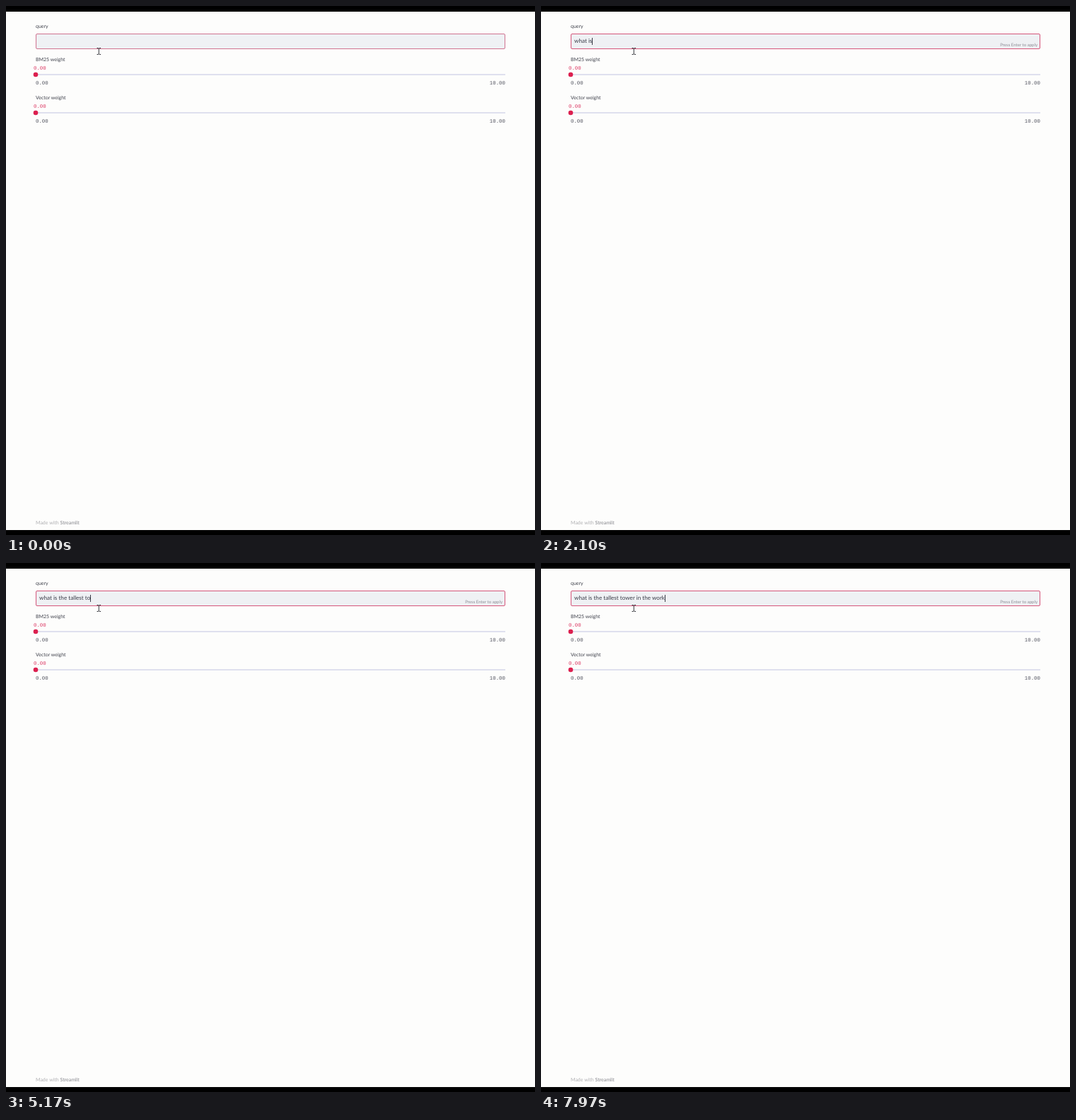
Animation, 748 px wide and 748 px high, one loop 8 s. Source, as an HTML page:

```html
<!DOCTYPE html>
<html lang="en">
<head>
<meta charset="utf-8">
<title>Search weights</title>
<style>
  html, body { margin: 0; width: 100%; height: 100%; overflow: hidden; background: #fdfdfc; }
  svg { display: block; width: 100vw; height: 100vh; }
  text { font: 7px Lato, "Open Sans", sans-serif; fill: #41434d; white-space: pre; text-rendering: geometricPrecision; }
  .num { font: 7.4px "Liberation Mono", "DejaVu Sans Mono", monospace; fill: #555762; }
  .value { fill: #dc3c66; }
  .end { text-anchor: end; }
  #typed { font-size: 8.15px; fill: #3a3c48; }
  #hint { font-size: 6.05px; fill: #8d8e96; }
  .footer { fill: #b0b0b3; }
  .footer tspan { fill: #84858b; }
  #field { fill: #eff1f4; stroke: #d5567a; animation: focus 8s linear infinite; }
  @keyframes focus {
    0% { stroke: #d07390; }
    2.9%, 100% { stroke: #d5567a; }
  }
</style>
</head>
<body>
<svg viewBox="0 0 748 748">
  <rect width="748" height="748" fill="#fdfdfc"/>
  <path d="M0 0H748V8H0zM0 741H748V748H0z"/>

  <text x="42" y="31">query</text>
  <rect id="field" x="42.5" y="39.5" width="663" height="21" rx="1.5"/>
  <text id="typed" x="47" y="52.3"></text>
  <rect id="caret" y="45" width="1" height="10" fill="#3a3c48"/>
  <text id="hint" class="end" x="702" y="57.3">Press Enter to apply</text>

  <g id="sliders"></g>

  <path d="M128.6 59.5H130.4L131.3 60.3L132.2 59.5H134M131.3 60V68M128.6 68.5H130.4L131.3 67.7L132.2 68.5H134"
        fill="none" stroke="#33343a" stroke-width="1"/>
  <text class="footer" x="42" y="732.6">Made with <tspan>Streamlit</tspan></text>
</svg>
<script>
  const LOOP = 8000, CARET_ON = 400, TEXT_X = 47;
  const QUERY = "what is the tallest tower in the work";
  // [time in ms, characters typed by then]
  const RHYTHM = [[570, 1], [1200, 2], [3000, 12], [4330, 19], [5130, 22], [6880, 29], [7950, 37]];

  const byId = id => document.getElementById(id);
  const typed = byId("typed"), caret = byId("caret"), hint = byId("hint");

  const slider = (label, y) => `
    <text x="42" y="${y - 19}">${label}</text>
    <text class="num value" x="39" y="${y - 6.6}">0.00</text>
    <rect x="42" y="${y - 0.8}" width="664" height="1.6" fill="#d9daeb"/>
    <circle cx="42" cy="${y}" r="3.3" fill="#dc204f"/>
    <text class="num" x="42" y="${y + 14.3}">0.00</text>
    <text class="num end" x="706" y="${y + 14.3}">10.00</text>`;
  byId("sliders").innerHTML = slider("BM25 weight", 97) + slider("Vector weight", 151);

  function typedCount(t) {
    if (t < RHYTHM[0][0]) return 0;
    for (let i = 1; i < RHYTHM.length; i++) {
      const [t0, n0] = RHYTHM[i - 1], [t1, n1] = RHYTHM[i];
      if (t < t1) return Math.floor(n0 + (n1 - n0) * (t - t0) / (t1 - t0));
    }
    return QUERY.length;
  }

  function draw() {
    const t = performance.now() % LOOP;
    const count = typedCount(t);
    const text = QUERY.slice(0, count);
    if (typed.textContent !== text) typed.textContent = text;
    const width = count ? typed.getComputedTextLength() : 0;
    caret.setAttribute("x", Math.round(TEXT_X + width - 0.4));
    caret.style.visibility = t >= CARET_ON ? "visible" : "hidden";
    hint.style.visibility = count ? "visible" : "hidden";
    requestAnimationFrame(draw);
  }
  draw();
</script>
</body>
</html>
```
